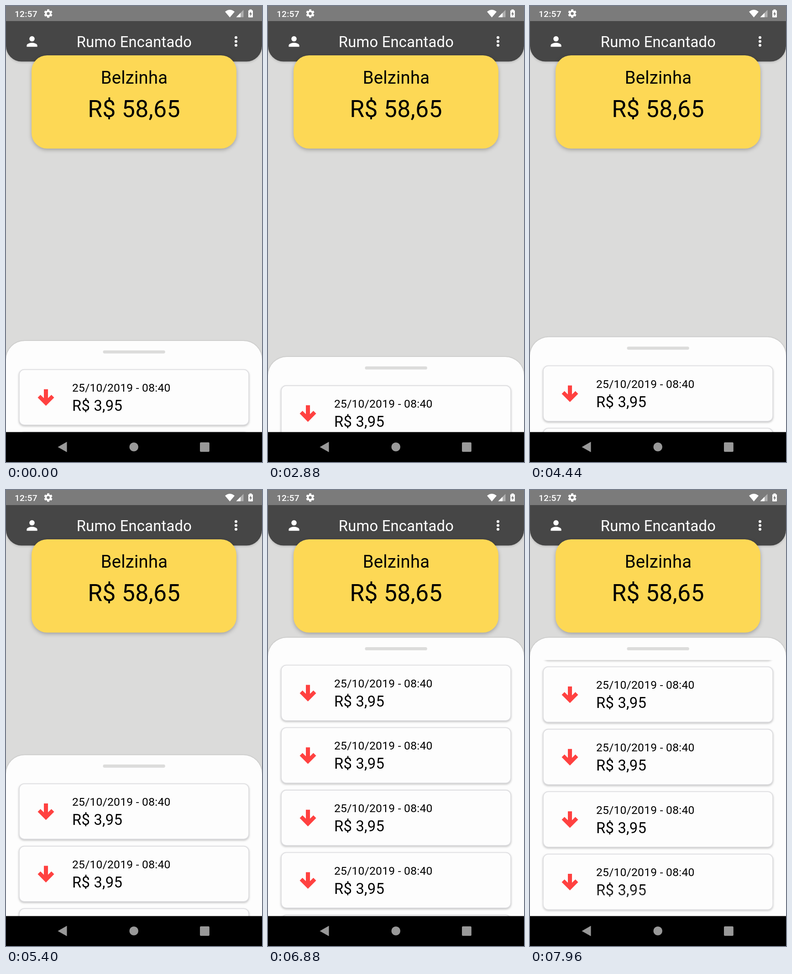
Recreate the animation shown at these times as an HTML page. Size 561 px wide and 998 px high, loop 8000 ms.

```html
<!DOCTYPE html>
<html lang="pt-BR">
<head>
<meta charset="utf-8">
<title>Rumo Encantado</title>
<style>
  html, body { margin: 0; width: 100%; height: 100%; overflow: hidden; background: #dbdbda; }
  svg { display: block; width: 100vw; height: 100vh; }
  text { font-family: Roboto, sans-serif; letter-spacing: .27px; }
  .mid { text-anchor: middle; }
  .white { fill: #fff; }
  .bar { filter: drop-shadow(0 2px 2px rgba(0, 0, 0, .16)); }
  .balance { filter: drop-shadow(0 3px 4px rgba(0, 0, 0, .27)); }
  .sheet { filter: drop-shadow(0 0 1.5px rgba(0, 0, 0, .22)); }
  .item rect { fill: #fdfdfd; stroke: #dcdcdf; stroke-width: 1.6; filter: drop-shadow(0 2.8px 2px rgba(0, 0, 0, .23)); }
</style>
</head>
<body>
<svg viewBox="0 0 561 998" preserveAspectRatio="none">
  <defs>
    <clipPath id="listClip"><rect y="49" width="561" height="620"/></clipPath>
  </defs>
  <rect width="561" height="998" fill="#dbdbda"/>

  <path class="bar" d="M0 0H561V87.500a34 34 0 0 1-34 34H34a34 34 0 0 1-34-34z" fill="#464646"/>
  <rect width="561" height="33" fill="#7b7b7b"/>

  <g class="white">
    <text x="19" y="24" font-size="19.100" font-weight="500">12:57</text>
    <path transform="translate(81.500 5.500) scale(.92)" fill-rule="evenodd" d="M19.430 12.980c.04-.32.07-.64.07-.98s-.03-.66-.07-.98l2.110-1.650c.19-.15.24-.42.12-.64l-2-3.460c-.12-.22-.39-.3-.61-.22l-2.490 1c-.52-.4-1.080-.73-1.690-.98l-.38-2.650C14.460 2.180 14.250 2 14 2h-4c-.25 0-.46.18-.49.42l-.38 2.650c-.61.25-1.170.59-1.690.98l-2.490-1c-.23-.09-.49 0-.61.22l-2 3.460c-.13.22-.07.49.12.64l2.110 1.650c-.04.32-.07.65-.07.98s.03.66.07.98l-2.110 1.650c-.19.15-.24.42-.12.64l2 3.460c.12.22.39.3.61.22l2.490-1c.52.4 1.080.73 1.690.98l.38 2.650c.03.24.24.42.49.42h4c.25 0 .46-.18.49-.42l.38-2.650c.61-.25 1.170-.59 1.690-.98l2.490 1c.23.09.49 0 .61-.22l2-3.460c.12-.22.07-.49-.12-.64zM12 15.500a3.500 3.500 0 1 1 0-7 3.500 3.500 0 0 1 0 7z"/>
    <path d="M480 12.500Q490.500 4 501 12.500L490.500 25z"/>
    <path d="M520.500 8.500V24.500H504.500z" opacity=".4"/>
    <path d="M514 15V24.500H504.500z"/>
    <path fill-rule="evenodd" d="M533.500 9.500V7.500h5v2h1.500q1 0 1 1V24q0 1-1 1h-8q-1 0-1-1V10.500q0-1 1-1zM537 12l-4 6h2.300v4.500l3.900-6.300H537z"/>

    <path transform="translate(39.600 60.200) scale(1.450)" d="M12 12a4 4 0 1 0 0-8 4 4 0 0 0 0 8zm0 2c-2.670 0-8 1.340-8 4v2h16v-2c0-2.660-5.330-4-8-4z"/>
    <text class="mid" x="281" y="90" font-size="32.700">Rumo Encantado</text>
    <circle cx="504" cy="69" r="3"/><circle cx="504" cy="77.500" r="3"/><circle cx="504" cy="86" r="3"/>
  </g>

  <rect class="balance" x="56" y="108" width="449" height="204" rx="34" fill="#fdd855"/>
  <text class="mid" x="281" y="169.500" font-size="38.200">Belzinha</text>
  <text class="mid" x="280.500" y="243" font-size="51.800">R$ 58,65</text>

  <g id="sheet">
    <path class="sheet" d="M0 700V41a41 41 0 0 1 41-41H520a41 41 0 0 1 41 41V700z" fill="#fdfdfd"/>
    <rect x="212.500" y="20.700" width="136.300" height="6.800" rx="3.400" fill="#dcdcdb"/>
    <g clip-path="url(#listClip)"><g id="list"></g></g>
  </g>
  <ellipse id="glow" cx="281" cy="933" rx="300" ry="67" fill="#fdfdfd"/>

  <rect y="932.500" width="561" height="65.500"/>
  <g fill="#999">
    <path d="M113.500 965.200L133.500 953.800V976.600z"/>
    <circle cx="280.200" cy="965" r="9.800"/>
    <rect x="425" y="955" width="20.800" height="20.800" rx="2"/>
  </g>
</svg>
<script>
  const LOOP = 8000, ITEMS = 5, PITCH = 136.67;
  const [sheet, list, glow] = ['sheet', 'list', 'glow'].map(id => document.getElementById(id));

  const linear = p => p;
  const easeOut = p => 1 - (1 - p) ** 2;
  const fling = p => p - Math.sin(2 * Math.PI * p) * .07;

  // Each key: time, value, easing used to arrive there
  const sheetKeys = [
    [2200, 733], [2880, 768], [3000, 774], [3040, 774], [3320, 733, easeOut],
    [4400, 733], [4440, 725], [5000, 591],
    [5360, 591], [5400, 580.6], [5720, 323.3, fling]
  ];
  const scrollKeys = [[6840, 0], [6880, 2.4], [7360, 84.2], [7680, 135.8]];
  const glowKeys = [[7680, 0], [7960, .14, easeOut]];

  function valueAt(keys, t) {
    const i = keys.findIndex(k => k[0] > t);
    if (i === 0) return keys[0][1];
    if (i < 0) return keys[keys.length - 1][1];
    const [t0, v0] = keys[i - 1], [t1, v1, ease = linear] = keys[i];
    return v0 + (v1 - v0) * ease((t - t0) / (t1 - t0));
  }

  const item = (_, i) => `
    <g class="item" transform="translate(0 ${62.5 + i * PITCH})">
      <rect x="29" y="0.300" width="503" height="121.200" rx="11"/>
      <path d="M83 43.300h9v19.500l7.500-7.300 6 6L87.500 79.600l-18-18.100 6-6 7.500 7.300z" fill="#ff4140"/>
      <text x="145" y="48.500" font-size="24.550">25/10/2019 - 08:40</text>
      <text x="145" y="90.500" font-size="32.700">R$ 3,95</text>
    </g>`;
  list.innerHTML = Array.from({ length: ITEMS }, item).join('');

  function draw(t) {
    sheet.setAttribute('transform', `translate(0 ${valueAt(sheetKeys, t)})`);
    list.setAttribute('transform', `translate(0 ${-valueAt(scrollKeys, t)})`);
    glow.setAttribute('opacity', valueAt(glowKeys, t));
  }

  const start = performance.now();
  function tick() {
    draw((performance.now() - start) % LOOP);
    requestAnimationFrame(tick);
  }
  tick();
</script>
</body>
</html>
```
